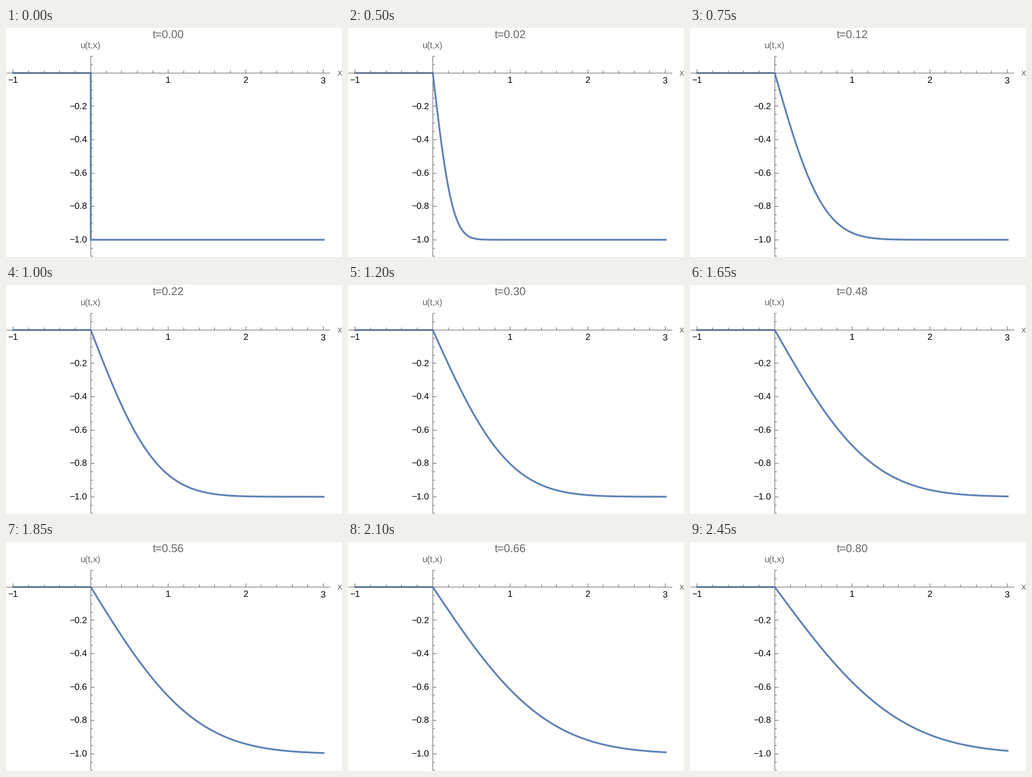
Write a matplotlib script that moves like this. It is 600 px wide and 409 px high and loops after 2.95 s.

```python
import math

import matplotlib.pyplot as plt
import numpy as np
from matplotlib.animation import FuncAnimation

W, H, DPI = 600, 409, 64
PT = 72 / DPI                  # points per pixel
X0, Y0 = 151.35, 80.4          # origin of the plot in pixels
DX, DY = 138.4, 297.8          # pixels per unit
AXIS_X, AXIS_Y = 151.5, 80.5   # pixel centres of the axes
GREY, BLUE = "#666666", "#5e81b5"
HOLD, STEPS, DT = 10, 40, 0.02  # frames held at each end, time steps

plt.rcParams["font.family"] = "Liberation Sans"
plt.rcParams["text.hinting"] = "none"

fig = plt.figure(figsize=(W / DPI, H / DPI), dpi=DPI, facecolor="white")
ax = fig.add_axes([0, 0, 1, 1])
ax.set_xlim(0, W)
ax.set_ylim(H, 0)
ax.axis("off")


def px(x):
    return X0 + DX * np.asarray(x)


def py(u):
    return Y0 - DY * np.asarray(u)


def crisp(v):
    """Centre of the pixel that holds v."""
    return math.floor(v) + 0.5


def label(x, y, text, size=16, color=GREY, ha="center"):
    return ax.text(x, y, text, fontsize=size * PT, color=color,
                   ha=ha, va="baseline")


def rule(xs, ys, z):
    ax.plot(xs, ys, color=GREY, lw=PT, solid_capstyle="butt", zorder=z,
            snap=False)


def number(value, digits):
    return f"{value:.{digits}f}".replace("-", "\u2212")


# Horizontal axis lies over the curve, vertical axis under it
rule([1, 579], [AXIS_Y, AXIS_Y], 4)
rule([AXIS_X, AXIS_X], [50, 408], 1)

for k in range(-5, 16):
    if k == 0:
        continue
    major = k % 5 == 0
    x = px(k / 5)
    rule([crisp(x)] * 2, [AXIS_Y, 74 if major else 76], 4)
    if major:
        label(x - 0.55, 98.5, number(k // 5, 0), color="black")

for k in range(-22, 3):
    if k == 0:
        continue
    major = k % 4 == 0
    y = py(k / 20)
    rule([AXIS_X, 158 if major else 155], [crisp(y)] * 2, 1)
    if major:
        label(145.3, y + 4.5, number(k / 20, 1), color="black", ha="right")

label(151, 36, "u(t,x)")
label(595.6, 85, "x")
title = label(289.5, 19, "", size=20)

curve, = ax.plot([], [], color=BLUE, lw=3.2 * PT, zorder=3, snap=False,
                 solid_capstyle="projecting", solid_joinstyle="miter")
LEFT, RIGHT = -1, 3.005
grid = np.linspace(0, RIGHT, 301)


def solution(t):
    """Heat flow from a unit step, held at zero on the left."""
    if t == 0:
        return [LEFT, 0, 0, RIGHT], [0, 0, -1, -1]
    u = [-math.erf(x / math.sqrt(4 * t)) for x in grid]
    return np.r_[LEFT, grid], np.r_[0, u]


def draw(i):
    t = DT * min(max(i - HOLD + 1, 0), STEPS)
    x, u = solution(t)
    curve.set_data(px(x), py(u))
    title.set_text(f"t={t:.2f}")
    return curve, title


anim = FuncAnimation(fig, draw, frames=2 * HOLD + STEPS - 1, interval=50,
                     repeat=True, repeat_delay=0)
plt.show()
```
